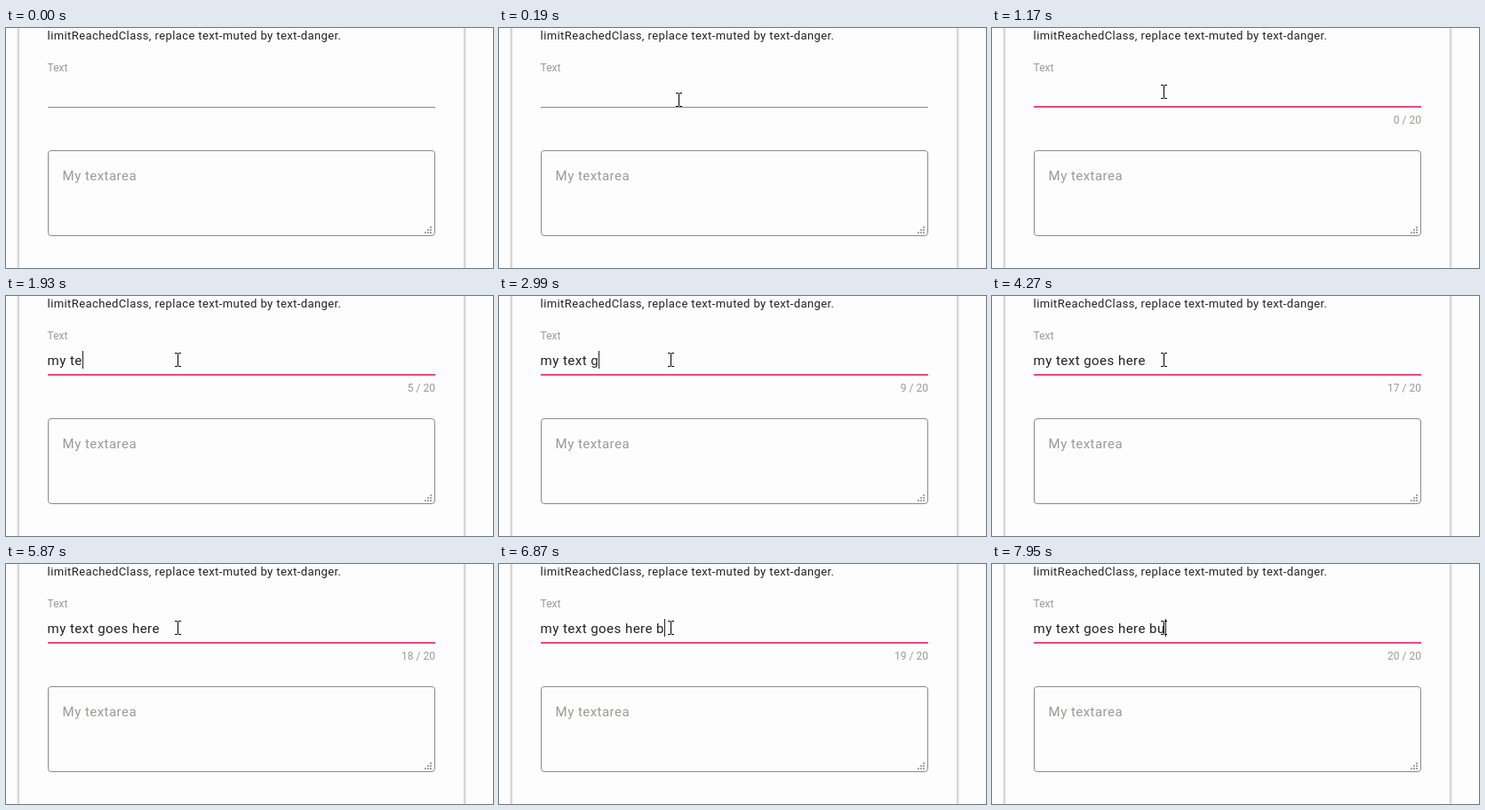
An HTML page that plays this animation: 548x271 px, repeating every 8 s.

```html
<!DOCTYPE html>
<html lang="en">
<head>
<meta charset="utf-8">
<title>Text field with character counter</title>
<style>
  html, body { margin: 0; width: 100%; height: 100%; overflow: hidden; background: #fdfdfd; }
  svg { display: block; width: 548px; height: 271px; font-family: Roboto, sans-serif; }
  text { white-space: pre; }
  .wide { letter-spacing: .031em; }
  .ink { fill: #212121; }
  .hint { fill: #9c9a96; }
</style>
</head>
<body>
<svg viewBox="0 0 548 271">
  <rect width="548" height="271" fill="#fdfdfd"/>
  <g fill="none" shape-rendering="crispEdges">
    <path d="M12.5 0V271M517.5 0V271" stroke="#ebebeb"/>
    <path d="M13.5 0V271M516.5 0V271" stroke="#dedede"/>
    <path d="M14.5 0V271M515.5 0V271" stroke="#cfcfcf"/>
  </g>

  <text class="ink wide" x="46.6" y="13" font-size="13">limitReachedClass, replace text-muted by text-danger.</text>
  <text class="hint" x="46.6" y="49" font-size="12">Text</text>
  <text id="value" class="ink wide" x="46.6" y="78" font-size="15"></text>
  <rect x="47" y="89" width="436" height="1" fill="#8a8a8a"/>
  <rect id="ripple" y="88" height="2" fill="#ff4081"/>
  <rect id="caret" class="ink" y="62" width="1" height="20"/>
  <text id="count" class="hint" x="483" y="108" font-size="12" text-anchor="end"></text>

  <rect id="area" x="47.5" y="138.5" width="435" height="96" rx="3.5" fill="none"/>
  <text class="hint wide" x="63.6" y="172" font-size="15">My textarea</text>
  <path id="grip" fill="#a4a4a4"/>

  <path id="pointer" d="M-3-8h3v1h-3zM1-8h3v1h-3zM0-7h1v14h-1zM-3 7h3v1h-3zM1 7h3v1h-3z" fill="#000"/>
</svg>
<script>
const LOOP = 8000;
const LIMIT = 20;
const LEFT = 47, RIGHT = 483;
const REST = { x: 193, y: 72 };
const ENTER = 60, CLICK = 400, FOCUS = 630;
const BLINK = 520;

// Each burst is typed at an even pace between two times
const BURSTS = [
  { text: "m", from: 1320, to: 1320 },
  { text: "y te", from: 1630, to: 1930 },
  { text: "xt ", from: 2160, to: 2450 },
  { text: "goes here", from: 2990, to: 4250 },
  { text: " ", from: 5640, to: 5640 },
  { text: "bu", from: 6870, to: 7030 },
];
const KEYS = BURSTS.flatMap(({ text, from, to }) =>
  [...text].map((char, i) => ({ char, at: from + (to - from) * i / Math.max(1, text.length - 1) })));

const $ = id => document.getElementById(id);
const [value, ripple, caret, count, area, grip, pointer] =
  ["value", "ripple", "caret", "count", "area", "grip", "pointer"].map($);

const show = (el, on) => el.setAttribute("visibility", on ? "visible" : "hidden");
const progress = (t, from, to) => Math.min(1, Math.max(0, (t - from) / (to - from)));
const beat = t => Math.floor((t - FOCUS) / BLINK);

// Triangle of dots in the corner of the text area
function drawGrip() {
  let d = "";
  for (let row = 0; row < 3; row++)
    for (let col = 2 - row; col < 3; col++)
      d += `M${471 + 3 * col} ${224 + 3 * row}h2v2h-2z`;
  grip.setAttribute("d", d);
}

// The pointer slides in diagonally and slows down over the field
function drawPointer(t) {
  const offset = Math.round(100 * (1 - progress(t, ENTER, CLICK)) ** 5);
  const y = REST.y + offset;
  const visible = t >= ENTER;
  show(pointer, visible);
  pointer.setAttribute("transform", `translate(${REST.x + offset} ${y})`);
  area.setAttribute("stroke", visible && y > 138 ? "#212121" : "#8a8a8a");
}

// The active line spreads from the clicked point to both ends
function drawRipple(t) {
  const spread = 1 - (1 - progress(t, CLICK, CLICK + 180)) ** 2;
  ripple.setAttribute("x", REST.x - (REST.x - LEFT) * spread);
  ripple.setAttribute("width", (RIGHT - LEFT) * spread);
}

// The caret toggles on every beat; a keystroke shows it again
function drawField(t) {
  const typed = KEYS.filter(key => key.at <= t);
  const lastKey = typed.length ? typed[typed.length - 1].at : FOCUS;
  value.textContent = typed.map(key => key.char).join("");
  count.textContent = t >= FOCUS ? `${typed.length} / ${LIMIT}` : "";
  const width = typed.length ? value.getComputedTextLength() : 0;
  caret.setAttribute("x", Math.floor(LEFT + width));
  show(caret, t >= FOCUS && (beat(t) - beat(lastKey)) % 2 === 0);
}

function draw(t) {
  drawPointer(t);
  drawRipple(t);
  drawField(t);
}

drawGrip();
const start = performance.now();
function tick() {
  draw((performance.now() - start) % LOOP);
  requestAnimationFrame(tick);
}
tick();
</script>
</body>
</html>
```
